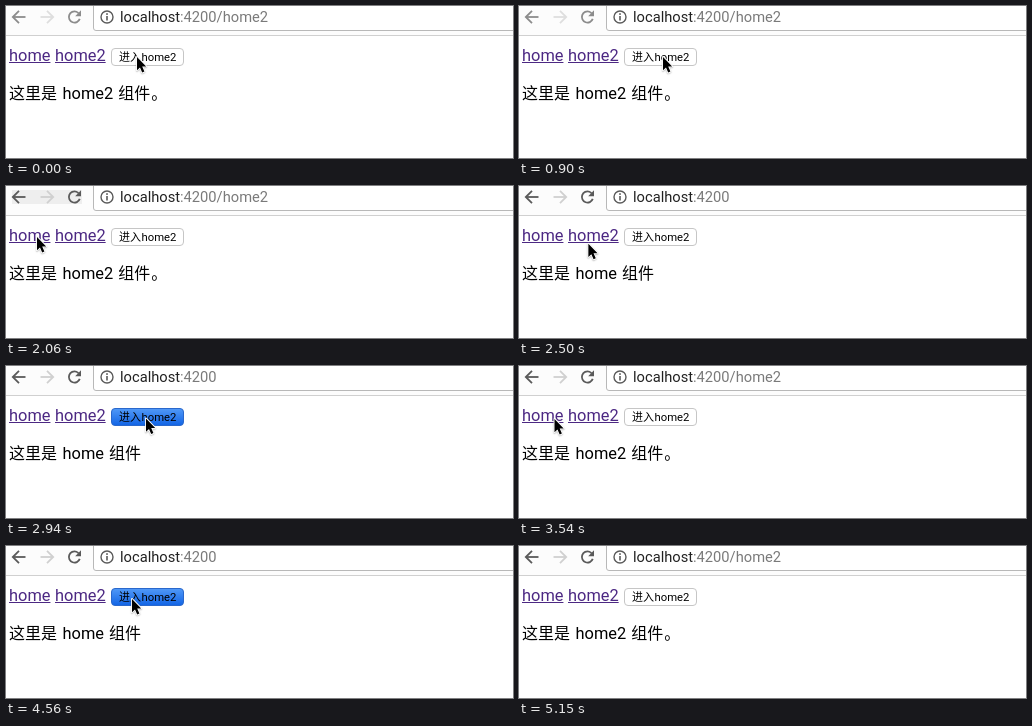
Recreate the animation shown at these times as an HTML page with a canvas. Size 507 by 152 pixels, loop 5870 ms.

```html
<!DOCTYPE html>
<html lang="zh">
<head>
<meta charset="utf-8">
<title>Router demo</title>
<style>
html, body { margin: 0; width: 507px; height: 152px; overflow: hidden; background: #fff; }
canvas { display: block; }
</style>
</head>
<body>
<canvas id="stage" width="507" height="152"></canvas>
<script>
const ctx = document.getElementById('stage').getContext('2d');
const LOOP = 5870;
const STEP = 147;
const LATIN = 'Roboto, "Liberation Sans", sans-serif';
const CJK = '"Noto Sans CJK SC", "Noto Sans CJK", sans-serif';

// Pointer glides: when each begins, how many steps it takes, where it rests
const glides = [
  { at: 450, steps: 2, x: 141, y: 50 },
  { at: 900, steps: 1, x: 143, y: 50 },
  { at: 1030, steps: 5, x: 30, y: 50 },
  { at: 2360, steps: 5, x: 139, y: 51.5 },
  { at: 3240, steps: 3, x: 34.5, y: 52 },
  { at: 4130, steps: 4, x: 125, y: 52 },
  { at: 5000, steps: 2, x: 290, y: 222 }
];

// Each visit to the home route: from the link click to the button release
const visits = [{ from: 2210, to: 3090 }, { from: 3980, to: 4710 }];

const within = (t, a, b) => t >= a && t < b;
const ease = p => p * p * (3 - 2 * p);

function pointerAt(t) {
  let x = 130, y = 50;
  for (const g of glides) {
    if (t < g.at) break;
    const step = Math.floor((t - g.at + 10) / STEP) + 1;
    const p = Math.min(1, step / g.steps);
    const sag = Math.abs(g.x - x) * 0.06 * Math.sin(Math.PI * p);
    x += (g.x - x) * ease(p);
    y += (g.y - y) * ease(p) + sag;
  }
  return [x, y];
}

function text(str, x, y, size, color, family = LATIN) {
  ctx.font = `${size}px ${family}`;
  ctx.fillStyle = color;
  ctx.fillText(str, x, y);
  return x + ctx.measureText(str).width;
}

function line(points, color, width) {
  ctx.beginPath();
  points.forEach(([x, y]) => ctx.lineTo(x, y));
  ctx.strokeStyle = color;
  ctx.lineWidth = width;
  ctx.stroke();
}

function arc(x, y, r, from, to, color, width) {
  ctx.beginPath();
  ctx.arc(x, y, r, from, to);
  ctx.strokeStyle = color;
  ctx.lineWidth = width;
  ctx.stroke();
}

function box(x, y, w, h, r, fill, stroke) {
  ctx.beginPath();
  ctx.roundRect(x, y, w, h, r);
  ctx.fillStyle = fill;
  ctx.fill();
  ctx.strokeStyle = stroke;
  ctx.lineWidth = 1;
  ctx.stroke();
}

function arrow(x, dir, color) {
  line([[x - 6.5 * dir, 11], [x + 6 * dir, 11]], color, 1.8);
  line([[x, 4.8], [x + 6.2 * dir, 11], [x, 17.2]], color, 1.8);
}

function reload(color) {
  arc(68.5, 11, 5.6, 0.35, Math.PI * 1.75, color, 1.8);
  ctx.beginPath();
  ctx.moveTo(75, 4.3);
  ctx.lineTo(75, 10.2);
  ctx.lineTo(69.2, 10.2);
  ctx.fillStyle = color;
  ctx.fill();
}

function toolbar(t, home) {
  ctx.fillStyle = '#fcfcfc';
  ctx.fillRect(0, 0, 507, 29);
  if (visits.some(v => within(t, v.from - 150, v.from))) {
    ctx.fillStyle = '#eee';
    ctx.fillRect(6, 4, 70, 14);
  }
  const faded = t < 1030;
  const icon = faded ? '#8c8c8c' : '#5a5a5a';
  arrow(13, -1, icon);
  arrow(41, 1, faded ? '#dedede' : '#d0d0d0');
  reload(icon);
  box(87.5, -10, 440, 34.5, 2.5, '#fff', '#b8b8b8');
  ctx.fillStyle = '#d0d0d0';
  ctx.fillRect(0, 29, 507, 1);

  arc(101, 11, 6, 0, Math.PI * 2, '#5a5a5a', 1.4);
  ctx.fillStyle = '#5a5a5a';
  ctx.fillRect(100.2, 10, 1.6, 4.5);
  ctx.fillRect(100.2, 7.2, 1.6, 1.7);

  const x = text('localhost', 114, 16, 14.7, '#222');
  text(home ? ':4200' : ':4200/home2', x, 16, 14.7, '#7a7a7a');
}

function link(str, x) {
  const end = text(str, x, 55, 16.4, '#4c2883');
  ctx.fillRect(x, 56, end - x, 1);
}

function button(pressed) {
  let fill = '#fff';
  if (pressed) {
    fill = ctx.createLinearGradient(0, 42, 0, 60);
    fill.addColorStop(0, '#539bf8');
    fill.addColorStop(1, '#0f62e4');
  }
  box(105.5, 42.5, 72, 17, 3.5, fill, pressed ? '#2a68cc' : '#c6c6c6');
  text('进入', 113, 55, 11, '#000', CJK);
  text('home2', 135.5, 55, 11.3, '#000');
}

function page(home, pressed) {
  link('home', 3);
  link('home2', 49);
  button(pressed);
  text('这里是', 3, 93, 16, '#000', CJK);
  let x = text(home ? 'home' : 'home2', 56.5, 93, 16.4, '#000');
  x = text('组件', x + 5, 93, 16, '#000', CJK);
  if (!home) text('。', x + 1, 93, 16, '#000', CJK);
}

function pointer(x, y) {
  ctx.save();
  ctx.translate(x, y);
  ctx.beginPath();
  [[1, 1], [1, 14.2], [4, 11.4], [6.2, 16.6], [8.4, 15.6], [6.2, 10.6], [10.2, 10.4]]
    .forEach(([px, py]) => ctx.lineTo(px, py));
  ctx.closePath();
  ctx.lineJoin = 'round';
  ctx.shadowColor = 'rgba(0,0,0,.3)';
  ctx.shadowBlur = 1.5;
  ctx.shadowOffsetY = 0.7;
  ctx.strokeStyle = '#fff';
  ctx.lineWidth = 1.8;
  ctx.stroke();
  ctx.shadowColor = 'transparent';
  ctx.fillStyle = '#000';
  ctx.fill();
  ctx.restore();
}

function draw(t) {
  const home = visits.some(v => within(t, v.from, v.to));
  const pressed = visits.some(v => within(t, v.to - 150, v.to));
  ctx.fillStyle = '#fff';
  ctx.fillRect(0, 0, 507, 152);
  toolbar(t, home);
  page(home, pressed);
  pointer(...pointerAt(t));
}

const start = performance.now();
function tick() {
  draw((performance.now() - start) % LOOP);
  requestAnimationFrame(tick);
}
tick();
</script>
</body>
</html>
```
